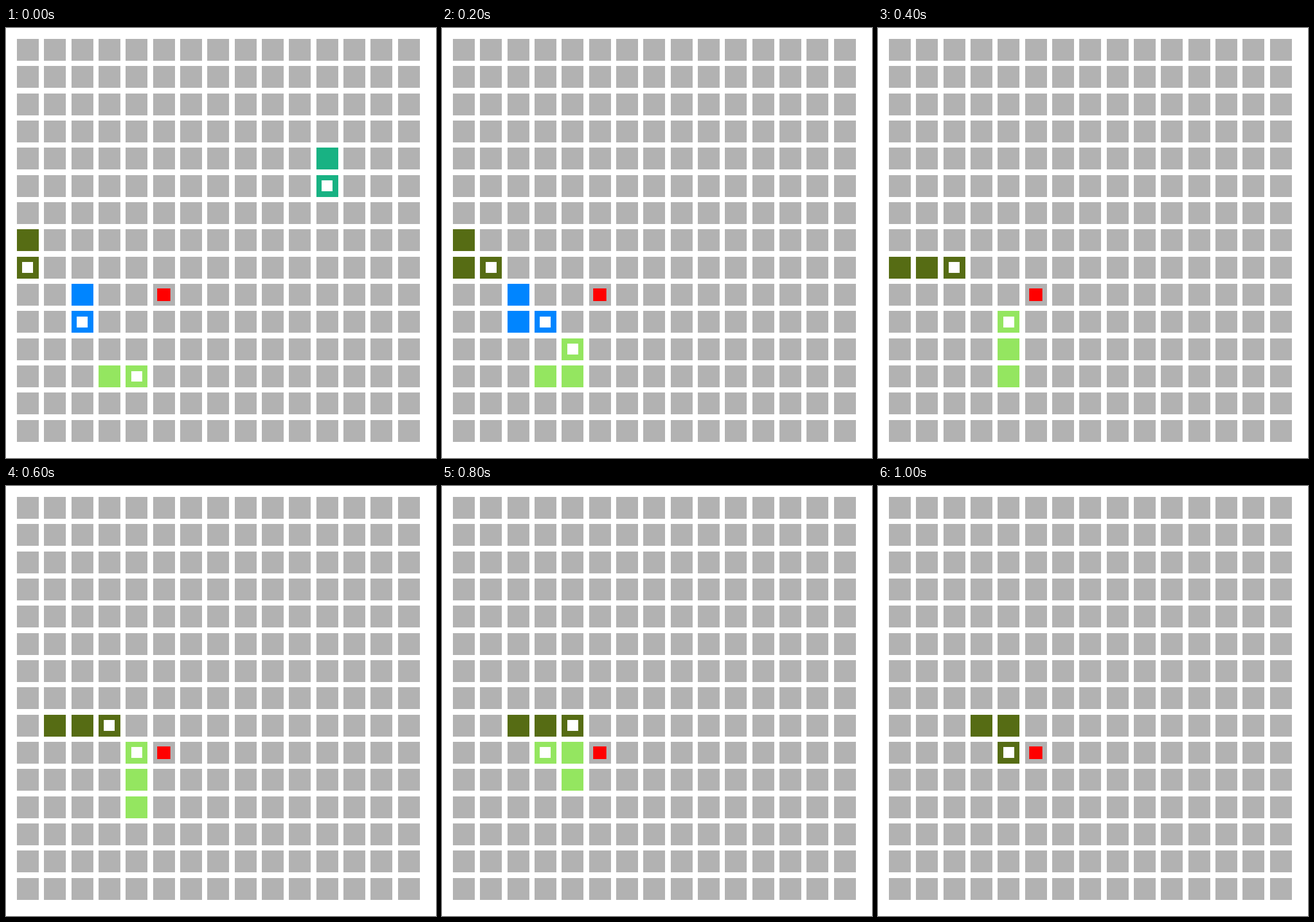
These frames come from a looping animation (748x748 px, 1200 ms). An HTML page:

```html
<!DOCTYPE html>
<html lang="en">
<head>
<meta charset="utf-8">
<title>Snakes on a grid</title>
<style>
  html, body { margin: 0; width: 100%; height: 100%; overflow: hidden; background: #fff; }
  svg { display: block; width: 748px; height: 748px; }
</style>
</head>
<body>
<svg id="board" viewBox="0 0 748 748" shape-rendering="crispEdges"></svg>
<script>
const GRID = 15, PITCH = 748 / 15.8, CELL = 38, STEP = 200, STEPS = 6, LENGTH = 3;
const DIRS = { U: [0, -1], D: [0, 1], L: [-1, 0], R: [1, 0] };

// Each snake starts coiled on its first cell; it vanishes when its moves run out.
const snakes = [
  { color: '#566c14', start: [0, 7], moves: 'DRRRRD' },
  { color: '#0085ff', start: [2, 9], moves: 'DR' },
  { color: '#94e660', start: [3, 12], moves: 'RUUUL' },
  { color: '#18b283', start: [11, 4], moves: 'D' }
];
const food = [5, 9];

const board = document.getElementById('board');

function addRect(parent, x, y, w, h, fill) {
  const rect = document.createElementNS('http://www.w3.org/2000/svg', 'rect');
  for (const [key, value] of Object.entries({ x, y, width: w, height: h, fill })) {
    rect.setAttribute(key, value);
  }
  parent.appendChild(rect);
}

function addCell(parent, [col, row], fill) {
  const edge = n => Math.round((n + 0.4) * PITCH);
  addRect(parent, edge(col), edge(row), CELL, CELL, fill);
}

// A square centred in its cell, snapped to whole pixels
function addDot(parent, [col, row], size, fill) {
  const low = n => Math.round((n + 0.8 - size / 2) * PITCH);
  const high = n => Math.round((n + 0.8 + size / 2) * PITCH);
  addRect(parent, low(col), low(row), high(col) - low(col), high(row) - low(row), fill);
}

function trace({ start, moves }) {
  const path = [start, start];
  for (const move of moves) {
    const [col, row] = path[path.length - 1];
    const [dx, dy] = DIRS[move];
    path.push([col + dx, row + dy]);
  }
  return path;
}

function addGroup() {
  return board.appendChild(document.createElementNS('http://www.w3.org/2000/svg', 'g'));
}

const ground = addGroup();
for (let row = 0; row < GRID; row++) {
  for (let col = 0; col < GRID; col++) addCell(ground, [col, row], '#b2b2b2');
}
addDot(ground, food, 0.48, '#ff0000');

const layer = addGroup();
for (const snake of snakes) snake.path = trace(snake);

let shown = -1;
function draw(time) {
  const step = Math.floor(time / STEP) % STEPS;
  if (step === shown) return;
  shown = step;
  layer.replaceChildren();
  for (const { color, path } of snakes) {
    const body = path.slice(step, step + LENGTH);
    if (body.length < LENGTH) continue;
    for (const cell of body) addCell(layer, cell, color);
    addDot(layer, body[LENGTH - 1], 0.4, '#fff');
  }
}

const begin = performance.now();
function tick() {
  draw(performance.now() - begin);
  requestAnimationFrame(tick);
}
tick();
</script>
</body>
</html>
```
